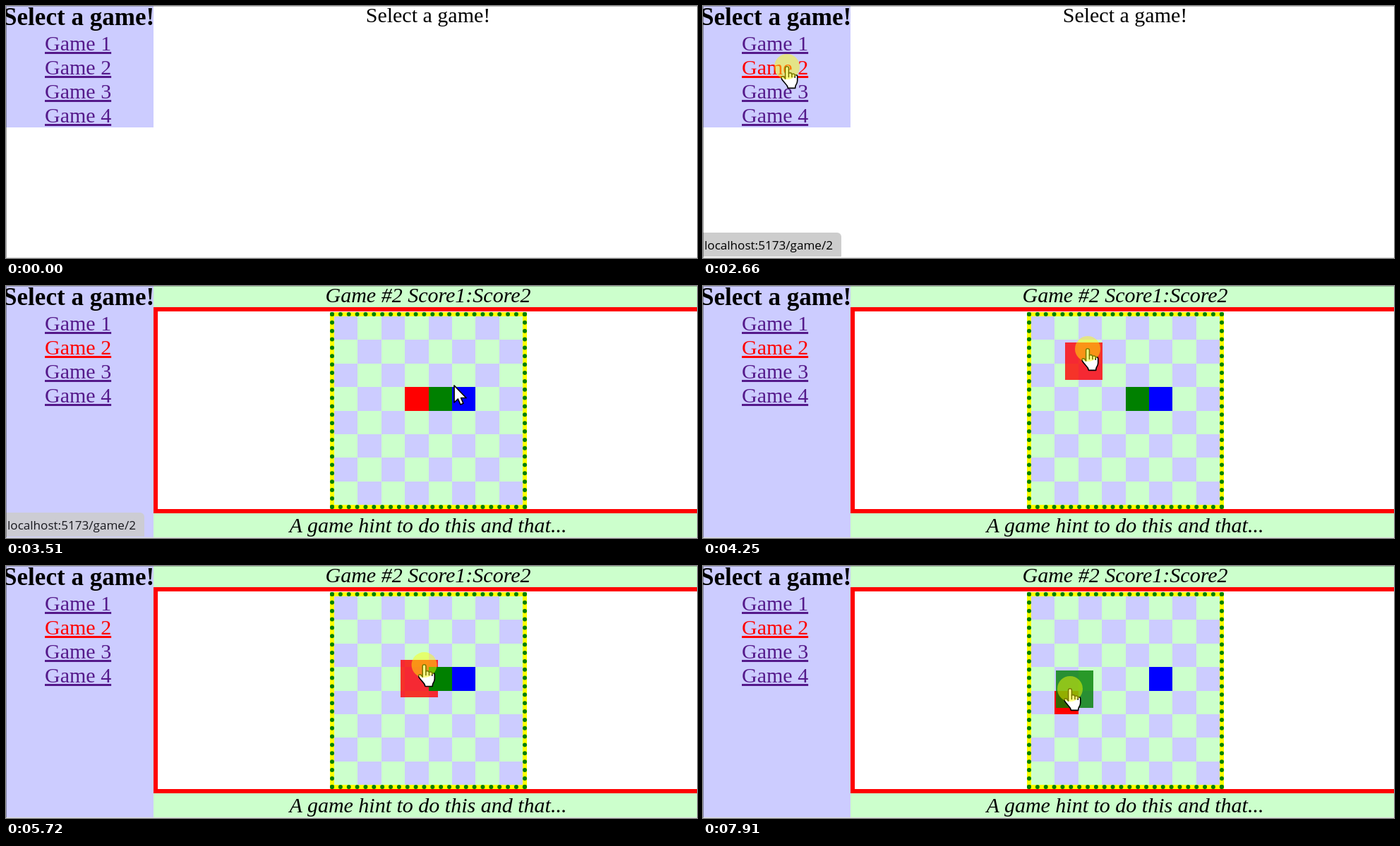
Write an HTML page that moves like this. It is 979 px wide and 357 px high and loops after 7990 ms.

```html
<!DOCTYPE html>
<html lang="en">
<head>
<meta charset="utf-8">
<title>Select a game!</title>
<style>
  html, body { margin: 0; width: 100%; height: 100%; overflow: hidden; background: #fff; }
  #stage { position: relative; width: 979px; height: 357px; overflow: hidden;
    font: 30px/34px "Liberation Serif", "Times New Roman", serif; color: #000; }
  #stage * { position: absolute; box-sizing: border-box; margin: 0; white-space: nowrap; }
  #side { left: 0; top: 0; width: 209px; height: 172px; background: #ccf; }
  #side.tall { height: 356px; }
  #side h3 { left: -4px; top: -4px; font-size: 35.1px; line-height: 39px; }
  #side a { left: 55px; color: #551a8b; text-decoration: underline; }
  #side a.on { color: red; }
  .line { left: 209px; width: 778px; height: 34px; text-align: center; }
  #game .line { background: #cfc; font-style: italic; }
  #frame { left: 209px; top: 30px; width: 778px; height: 292px; border: 6px solid red; }
  #board { left: 459px; top: 37px; width: 279px; height: 279px;
    border: 6px dotted green; background: yellow; }
  #status { left: 0; top: 321px; width: 196px; height: 34px; padding-left: 2px; background: #cdcdcd;
    border-radius: 0 6px 0 0; font: 17.1px/35px "Open Sans", sans-serif; }
  #edge { inset: 0; border: solid; border-width: 1px 0 1px 1px;
    border-color: rgba(0,0,0,.27) transparent rgba(0,0,0,.13) rgba(0,0,0,.35); }
  #over { left: 0; top: 0; }
</style>
</head>
<body>
<div id="stage">
  <div id="side">
    <h3>Select a game!</h3>
  </div>
  <p id="intro" class="line" style="top:-4px">Select a game!</p>
  <div id="game">
    <p class="line" style="top:-4px">Game #2 Score1:Score2</p>
    <p class="line" style="top:322px">A game hint to do this and that...</p>
    <div id="frame"></div>
    <div id="board"></div>
    <div id="blue" style="background:blue"></div>
    <div id="red" style="background:red"></div>
    <div id="green" style="background:green"></div>
  </div>
  <div id="status">localhost:5173/game/2</div>
  <div id="edge"></div>
  <svg id="over" width="979" height="357">
    <g id="cursor" fill="#fff" stroke="#000" stroke-width="1.7" stroke-linejoin="round">
      <path id="arrow" d="M0 0V24L5.3 19 9 27 13 25.3 9.6 17.5H17Z"/>
      <g id="hand" transform="scale(.95)">
        <path d="M-2.5 18V2Q-2.5 -.3 0 -.3T2.5 2V9.5Q6 8 7.3 11Q10.5 9.5 12 12.5Q15.5 11.5 15.5 15V21Q15.5 24 13 28Q12.3 29.5 12.3 32H1.5Q1 28.5 -3 24.5Q-10 17 -8 15Q-5.5 13 -2.5 18Z"/>
        <path d="M2.5 9V16M7.3 11V16M11.8 12.5V16.5" fill="none"/>
      </g>
      <circle id="press" r="18" fill="#ff0" fill-opacity=".47" stroke="none"/>
    </g>
  </svg>
</div>
<script>
const LOOP = 7990, STEP = 80, CELL = 267 / 8, BIG = 53.4;
const $ = id => document.getElementById(id);
const show = (el, on) => { el.style.display = on ? "" : "none"; };

// Each move starts where the last one ended; bow bends it into an arc.
// A dragged piece hangs from the pointer by its grip.
const moves = [
  { from: 1490, till: 1650, to: [112, 98], look: "arrow" },
  { from: 1830, till: 1830, to: [119, 86] },
  { from: 3170, till: 3490, to: [635, 141], look: "arrow" },
  { from: 3490, till: 3650, to: [586, 142], look: "arrow" },
  { from: 3930, till: 4250, to: [545, 89], drag: "red", grip: [30, 5] },
  { from: 4250, till: 4650, to: [652, 80], bow: [0, -16], drag: "red", grip: [32, 9] },
  { from: 4740, till: 5060, to: [630, 74], bow: [28, 14], drag: "red", grip: [34, 14] },
  { from: 5060, till: 5460, to: [617, 128], bow: [-92, -10], drag: "red", grip: [34, 14] },
  { from: 5560, till: 6280, to: [526, 172], bow: [-20, 10], drag: "red", grip: [34, 7] },
  { from: 6280, till: 6600, to: [611, 159] },
  { from: 6600, till: 6840, to: [540, 165], drag: "green", grip: [23, 26] },
  { from: 7010, till: 7410, to: [510, 191], bow: [-2, -22], drag: "green", grip: [21, 26] },
  { from: 7660, till: 7900, to: [520, 174], drag: "green", grip: [20, 26] }
];
moves.forEach((m, i) => { m.start = i ? moves[i - 1].to : [900, 275]; });

function pointer(m, t) {
  const span = m.till - m.from;
  const f = span ? Math.min(1, Math.floor((t - m.from) / STEP) * STEP / span) : 1;
  const ease = (1 - Math.cos(Math.PI * f)) / 2, bow = m.bow || [0, 0];
  return m.to.map((end, i) => m.start[i] + (end - m.start[i]) * ease + bow[i] * 4 * f * (1 - f));
}

function place(el, [x, y], size, opacity = 1) {
  Object.assign(el.style, { left: x + "px", top: y + "px", width: size + "px", height: size + "px", opacity });
}
const settle = (id, col, row) => place($(id), [465 + col * CELL, 43 + row * CELL], CELL);

for (let i = 0; i < 4; i++) {
  const link = document.createElement("a");
  link.textContent = "Game " + (i + 1);
  link.style.top = 36 + 34 * i + "px";
  if (i === 1) link.id = "link";
  $("side").append(link);
}
for (let i = 0; i < 64; i++) {
  const cell = document.createElement("div"), col = i % 8, row = i >> 3;
  cell.style.background = (col + row) % 2 ? "#cfc" : "#ccf";
  place(cell, [col * CELL, row * CELL], CELL);
  $("board").append(cell);
}
settle("blue", 5, 3);

function draw(t) {
  const open = t >= 2820;
  show($("intro"), !open);
  show($("game"), open);
  $("side").classList.toggle("tall", open);
  $("link").classList.toggle("on", t >= 2660);
  show($("status"), t >= 1910 && t < 3650);
  $("status").style.opacity = t < 3490 ? 1 : .88;

  settle("red", ...(t < 3930 ? [3, 3] : [1, 4]));
  settle("green", 4, 3);

  const move = moves.findLast(m => m.from <= t);
  show($("cursor"), move);
  if (!move) return;
  const pos = pointer(move, t);
  if (move.drag) place($(move.drag), pos.map((p, i) => p - move.grip[i]), BIG, .8);
  const arrow = move.look === "arrow" && !(open && t >= 3650);
  show($("arrow"), arrow);
  show($("hand"), !arrow);
  show($("press"), move.drag || (t >= 2660 && !open));
  $("cursor").setAttribute("transform", `translate(${pos})`);
}

const begin = performance.now();
function tick() {
  draw((performance.now() - begin) % LOOP);
  requestAnimationFrame(tick);
}
tick();
</script>
</body>
</html>
```
